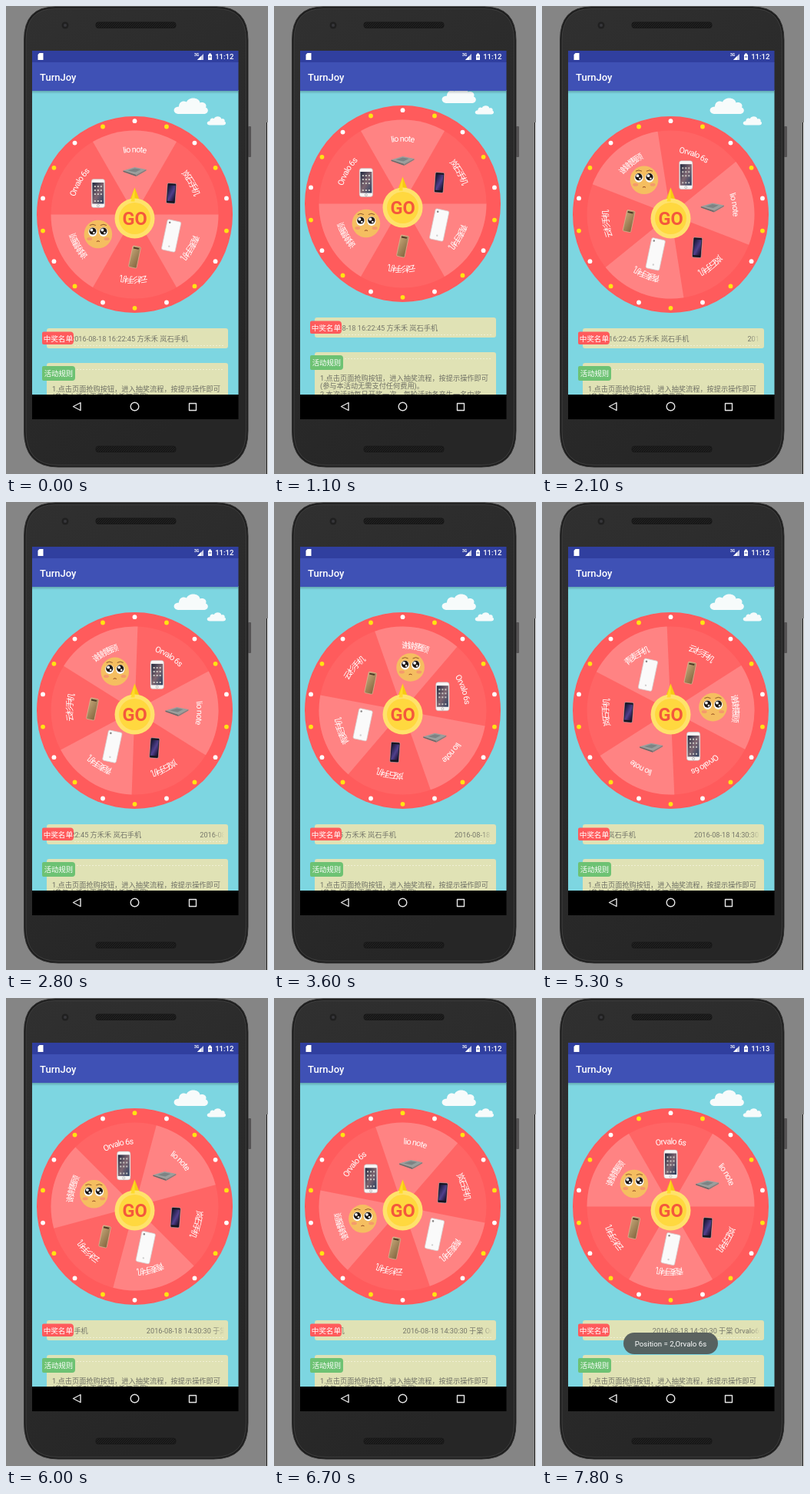
Animation of 341 by 607 pixels, one loop 7900 ms. Source, as an HTML page:

```html
<!DOCTYPE html>
<html lang="zh-CN">
<head>
<meta charset="utf-8">
<style>
html, body { margin: 0; width: 100%; height: 100%; overflow: hidden; background: #858585; }
svg { display: block; width: 100vw; height: 100vh; font-family: Roboto, "Noto Sans CJK SC", "Noto Sans CJK", sans-serif; }
text { white-space: pre; }
</style>
</head>
<body>
<svg viewBox="0 0 341 607" preserveAspectRatio="none">
  <defs>
    <clipPath id="page"><rect x="34" y="109" width="268.500" height="395"/></clipPath>
    <linearGradient id="shade" x2="0" y2="1">
      <stop offset="0" stop-color="#000" stop-opacity=".22"/><stop offset="1" stop-color="#000" stop-opacity="0"/>
    </linearGradient>
    <linearGradient id="body" x2=".5" y2="1"><stop offset="0" stop-color="#303030"/><stop offset="1" stop-color="#262626"/></linearGradient>
    <linearGradient id="fade"><stop offset="0" stop-color="#fff"/><stop offset=".93" stop-color="#fff"/><stop offset="1"/></linearGradient>
    <linearGradient id="display" x2="1" y2="1"><stop offset="0" stop-color="#1f2a40"/><stop offset=".5" stop-color="#7d6570"/><stop offset="1" stop-color="#293f60"/></linearGradient>
    <linearGradient id="violet" x2="1" y2="1"><stop offset="0" stop-color="#11132e"/><stop offset=".55" stop-color="#51408c"/><stop offset="1" stop-color="#170d28"/></linearGradient>
    <linearGradient id="gold" x2="1" y2="1"><stop offset="0" stop-color="#c4a677"/><stop offset="1" stop-color="#83653f"/></linearGradient>
    <mask id="ticker" maskUnits="userSpaceOnUse" x="86" y="415" width="198" height="32"><rect x="86" y="415" width="198" height="32" fill="url(#fade)"/></mask>
    <pattern id="mesh" width="3" height="3" patternUnits="userSpaceOnUse"><rect width="3" height="3" fill="#202020"/><path d="M0 3L3 0" stroke="#111"/></pattern>
    <path id="arc" d="M-70.1 -40.5A81 81 0 0 1 70.1 -40.5"/>
  </defs>

  <rect width="341" height="607" fill="#858585"/>
  <path d="M339.5 151V607" stroke="#161616"/>
  <path d="M340.5 151V607" stroke="#f4f4f4"/>

  <rect x="315" y="156" width="4" height="40" rx="1" fill="#555354"/>
  <path d="M64 1H274Q315 1 315 44V551Q315 598 270 598H68Q23.500 598 23.500 551V44Q23.500 1 64 1Z" fill="#1d1d1d" stroke="#333"/>
  <path d="M64 3.500H274Q312.500 3.500 312.500 44V551Q312.500 595.500 270 595.500H68Q26 595.500 26 551V44Q26 3.500 64 3.500Z" fill="url(#body)" stroke="#454545" stroke-width=".8"/>
  <circle cx="77" cy="25" r="4.500" fill="#202020"/><circle cx="77" cy="25" r="2" fill="#37373b"/>
  <rect x="117" y="21" width="104" height="7.500" rx="3" fill="url(#mesh)" stroke="#181818"/>
  <rect x="117" y="571" width="104" height="7.500" rx="3" fill="url(#mesh)" stroke="#181818"/>

  <g clip-path="url(#page)">
    <rect x="34" y="109" width="269" height="395" fill="#7dd6e1"/>
    <g id="content">
      <g fill="#f7fbfb">
        <path id="cloud" d="M225 140C217 140 216 131 225 130.500C225 124 231 122 235 124.500C238 117.500 251 118 252.500 125.500C258 123.500 262 128 260 131.500C265 134 263 140 257 140Z"/>
        <use href="#cloud" transform="translate(141.500 77.500) scale(.55)"/>
      </g>
      <g transform="translate(167.500 270.500)">
        <circle r="127.500" fill="#ff5b5c"/>
        <circle r="109" fill="#ff6565"/>
        <g id="lights"></g>
        <g id="wheel"></g>
        <g id="prizes"></g>
        <path d="M-7 -17L0 -35L7 -17Z" fill="#f7ca11"/>
        <circle cy="5" r="26" fill="#ffe26b"/>
        <circle cy="5" r="20.500" fill="#ffd83f"/>
        <path d="M-5 -17L0 -35V-17Z" fill="#ffdb2b"/>
        <text y="13.200" text-anchor="middle" font-weight="700" font-size="23.500" fill="#f4583c">GO</text>
      </g>

      <rect x="53" y="418" width="236" height="26" rx="3" fill="#e0e2b5"/>
      <path d="M89 440.500H283" stroke="#f0f0d4" stroke-dasharray="2 2"/>
      <g mask="url(#ticker)"><g id="winners" font-size="9.200" fill="#75766a">
        <text y="434.500">2016-08-18 16:22:45 方禾禾 岚石手机</text>
        <text x="229" y="434.500">2016-08-18 14:30:30 于棠 Orvalo6s</text>
      </g></g>
      <path d="M49 422.500H84Q88 422.500 88 427V434.500Q88 439 84 439H49Q47 439 47 437V424.500Q47 422.500 49 422.500Z" fill="#ff5b5c"/>
      <text x="48.700" y="434.500" font-size="9.600" fill="#fff">中奖名单</text>

      <rect x="53" y="463" width="236" height="150" rx="3" fill="#e0e2b5"/>
      <path d="M92 471.500H283" stroke="#f0f0d4" stroke-dasharray="2 2"/>
      <path d="M49 467H86Q90 467 90 471V482Q90 486 86 486H49Q47 486 47 484V469Q47 467 49 467Z" fill="#6dc273"/>
      <text x="49.700" y="480" font-size="9.400" fill="#fff">活动规则</text>
      <g id="rules" font-size="9.200" fill="#6f7065"></g>
    </g>
    <rect x="34" y="110" width="269" height="4" fill="url(#shade)"/>
  </g>

  <rect x="34" y="58" width="268.500" height="15.500" fill="#303f9f"/>
  <rect x="34" y="73" width="268.500" height="37" fill="#3f51b5"/>
  <text x="44" y="97" font-size="13" font-weight="500" fill="#fff">TurnJoy</text>
  <g fill="#fff">
    <path d="M43.500 61H48.500V70H41.500V63Z"/>
    <text x="245" y="65" font-size="5" font-weight="700">3G</text>
    <path d="M249 70L257 62V70Z" opacity=".75"/><path d="M249 70L254 65V70Z"/>
    <path d="M264 61.500H267V63H268V70H263V63H264Z"/>
    <path d="M264 66H267" stroke="#303f9f"/>
    <text id="clock" x="296.500" y="69.300" text-anchor="end" font-size="9.600" font-weight="500"></text>
  </g>

  <rect x="34" y="504" width="268.500" height="32" fill="#000"/>
  <g fill="none" stroke="#e6e6e6" stroke-width="1.400" stroke-linejoin="round">
    <path d="M97 514.500V524.500L87.500 519.500Z"/><circle cx="167.500" cy="519.500" r="5.300"/><rect x="238.500" y="515.500" width="9" height="9"/>
  </g>

  <g id="toast">
    <rect x="106" y="434" width="123" height="28" rx="14" fill="#555c5b" opacity=".95"/>
    <text x="167.500" y="451.700" text-anchor="middle" font-size="9.700" fill="#fff">Position = 2,Orvalo 6s</text>
  </g>
</svg>
<script>
const LOOP = 7900, STEP = 100, SPIN_TOTAL = 11 * 360 + 60;
const SPIN_START = 1540, SPIN_END = 7100;
const $ = id => document.getElementById(id);
const polar = (deg, r) => [r * Math.sin(deg * Math.PI / 180), -r * Math.cos(deg * Math.PI / 180)];

const eye = x => `<ellipse cx="${x}" cy="-3" rx="5.600" ry="6" fill="#fff"/><circle cx="${x}" cy="-4" r="4.600" fill="#1d1714"/>
  <circle cx="${x - 1.5}" cy="-5.500" r="1.900" fill="#fff"/><circle cx="${x + 1.5}" cy="-2" r="1.300" fill="#fff"/>
  <ellipse cx="${x * 1.6}" cy="6" rx="3.500" ry="2" fill="#f59a6b"/>
  <path d="M${x - 4} -11.500Q${x} -14 ${x + 4} -11.500" fill="none" stroke="#75401d" stroke-width=".8"/>`;

const prizes = [
  ['lio note', `<path d="M-15 -2L0 -6.500L15 -3.500L2 3.500Z" fill="#9a9f9d"/><path d="M-15 -2L2 3.500V5.500L-15 -.5Z" fill="#656b6b"/>
    <path d="M2 3.500L15 -3.500V-2L2 5.500Z" fill="#7c8180"/><path d="M-9 -2L0 -5L8 -3.500L1 0Z" fill="#7d8384"/>`],
  ['岚石手机', `<g transform="rotate(4)"><rect x="-5.800" y="-13" width="11.600" height="26" rx="1.500" fill="#17151f" stroke="#c9bfc8" stroke-width=".5"/>
    <rect x="-4.700" y="-10.500" width="9.400" height="20.500" fill="url(#violet)"/></g>`],
  ['青麦手机', `<g transform="rotate(12)"><rect x="-9" y="-20" width="18" height="40" rx="2" fill="#fafafa" stroke="#d4d1d1" stroke-width=".7"/>
    <circle cx="-5.500" cy="-16.500" r="1.300" fill="#888"/><circle cy="14" r="1.200" fill="#d0d0d0"/></g>`],
  ['云杉手机', `<g transform="rotate(12)"><rect x="-5.300" y="-14" width="10.600" height="28" rx="1.500" fill="url(#gold)" stroke="#d8c39c" stroke-width=".6"/>
    <path d="M-4 -11.500H3" stroke="#4c3a28" stroke-width="2"/></g>`],
  ['谢谢惠顾', `<g transform="translate(0 -2)"><circle r="18.300" fill="#f5be60"/>${eye(-7)}${eye(7)}
    <path d="M-2 9.500Q0 8 2 9.500" fill="none" stroke="#8b421d"/></g>`],
  ['Orvalo 6s', `<rect x="-8.700" y="-18.500" width="17.400" height="37" rx="3" fill="#f7f5f5" stroke="#b5aeae" stroke-width=".5"/>
    <rect x="-7.500" y="-14" width="15" height="27.500" fill="url(#display)"/>
    <path d="M-5 -9H5M-5 -4H5M-5 1H5M-5 10H5" stroke="#c9c6c2" stroke-width="2" stroke-dasharray="2 2"/>
    <circle cy="16" r="1.500" fill="none" stroke="#999" stroke-width=".6"/>`]
];

const [edgeX, edgeY] = polar(30, 109);
$('wheel').innerHTML = prizes.map(([name], i) => `<g transform="rotate(${i * 60})">
  ${i % 2 ? '' : `<path d="M0 0L${-edgeX} ${edgeY}A109 109 0 0 1 ${edgeX} ${edgeY}Z" fill="#ff8383"/>`}
  <text font-size="10.800" fill="#fff" text-anchor="middle" letter-spacing="${name.charCodeAt(0) > 255 ? -2.6 : -.8}">
  <textPath href="#arc" startOffset="50%">${name}</textPath></text></g>`).join('');
$('prizes').innerHTML = prizes.map(([, art]) => `<g>${art}</g>`).join('');
$('lights').innerHTML = Array.from({ length: 18 }, (_, i) => {
  const [x, y] = polar(i * 20, 121.3);
  return `<circle cx="${x}" cy="${y}" r="2.900"/>`;
}).join('');
$('rules').innerHTML = [
  '1.点击页面抢购按钮，进入抽奖流程，按提示操作即可',
  '(参与本活动无需支付任何费用)。',
  '2.本次活动每日开奖一次，每轮活动各产生一名中奖',
  '用户，奖品以页面展示为准。',
  '3.中奖后请按页面提示领取奖品，逾期视为放弃。'
].map((line, i) => `<text x="60" y="${499.5 + i * 10.6}">${line}</text>`).join('');

function track(points, t) {
  const next = points.findIndex(p => p[0] > t);
  if (next < 0) return points[points.length - 1][1];
  if (next === 0) return points[0][1];
  const [t0, a] = points[next - 1], [t1, b] = points[next];
  return a + (b - a) * (t - t0) / (t1 - t0);
}

const scrollPath = [[150, 0], [300, -24], [500, -52], [700, -56], [900, -42], [1100, -14], [1300, -3], [1450, 0]];
const spinPath = [[1600, 0], [2800, .2177], [3600, .3698], [4500, .5403], [6000, .8024], [7087, 1]];

function lightsSwapped(t) {
  if (t < SPIN_START) return Math.floor(t / 500) % 2 === 1;
  if (t < SPIN_END) return Math.floor((t - SPIN_START) / 106) % 2 === 0;
  return t < 7600;
}

function render(time) {
  const t = Math.floor(time % LOOP / STEP) * STEP;
  const angle = SPIN_TOTAL * (1 - Math.cos(Math.PI * track(spinPath, t))) / 2;
  $('content').setAttribute('transform', `translate(0 ${track(scrollPath, t)})`);
  $('wheel').setAttribute('transform', `rotate(${angle})`);
  [...$('prizes').children].forEach((g, i) => g.setAttribute('transform', `translate(${polar(angle + i * 60, 55)})`));
  const swapped = lightsSwapped(t);
  [...$('lights').children].forEach((dot, i) => dot.setAttribute('fill', (i % 2 === 1) !== swapped ? '#ffe312' : '#fff'));
  $('winners').setAttribute('transform', `translate(${84 - .0217 * t} 0)`);
  $('clock').textContent = t < 6900 ? '11:12' : '11:13';
  $('toast').setAttribute('opacity', track([[7100, 0], [7300, 1]], t));
}

const start = performance.now();
function tick() {
  render(performance.now() - start);
  requestAnimationFrame(tick);
}
tick();
</script>
</body>
</html>
```
